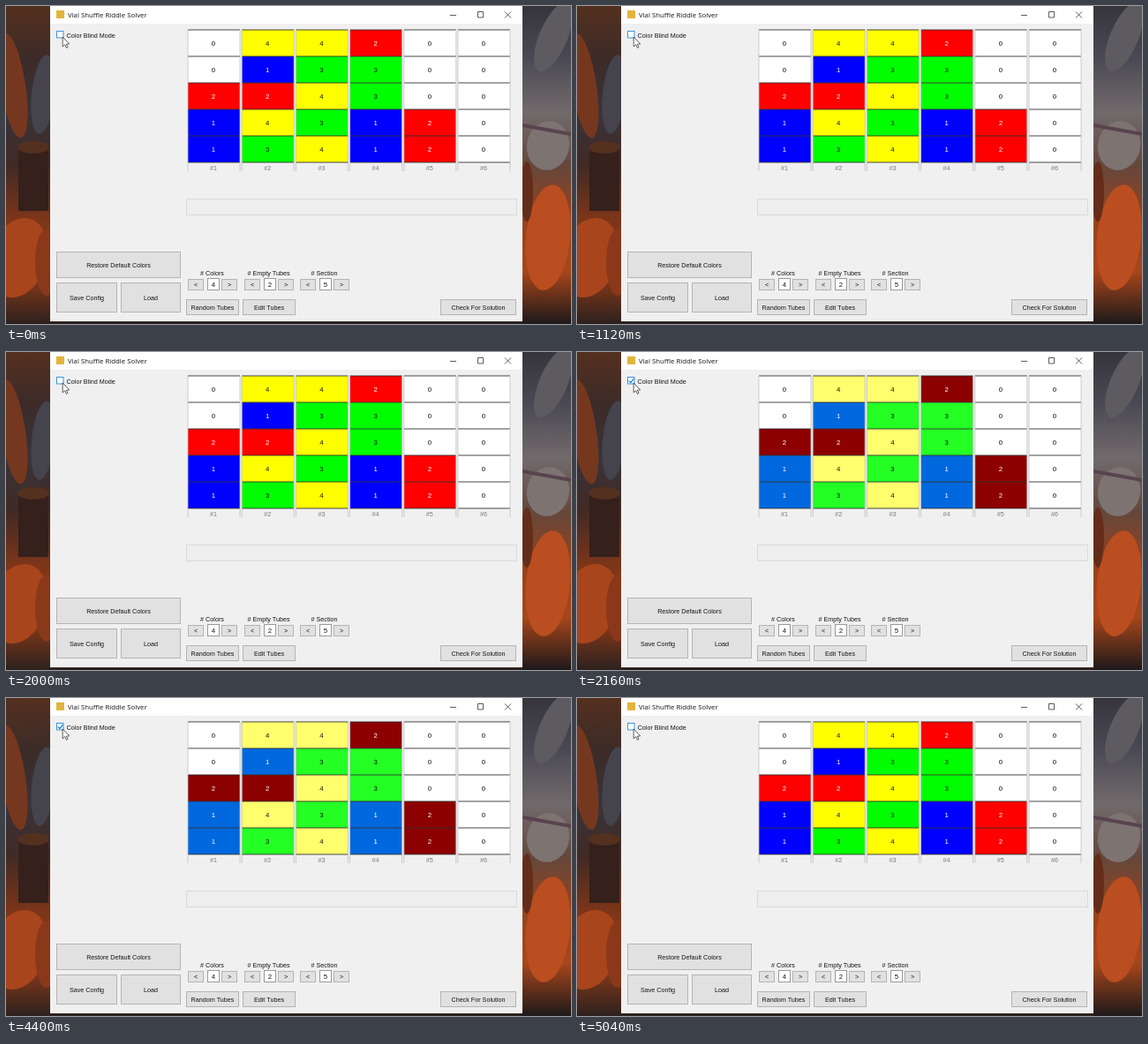
Animation of 640x360 px, one loop 5600 ms. Source, as an HTML page with a canvas:

```html
<!DOCTYPE html>
<html lang="en">
<head>
<meta charset="utf-8">
<title>Puzzle window</title>
<style>
html, body { margin: 0; width: 100%; height: 100%; overflow: hidden; background: #222; }
canvas { display: block; width: 640px; height: 360px; }
</style>
</head>
<body>
<canvas id="stage" width="640" height="360"></canvas>
<script>
const ctx = document.getElementById('stage').getContext('2d');
const LOOP = 5600, CHECK_AT = 2080, UNCHECK_AT = 4560;
const SANS = '"Liberation Sans", Arial, sans-serif';
const UI = '7.2px ' + SANS, DIGIT = '7.8px ' + SANS;
const TITLE = '7.8px "Open Sans", "Noto Sans", sans-serif';

// Fill colours by tube value: empty, blue, red, green, yellow
const NORMAL = ['#fff', '#0000fe', '#fe0000', '#00fe00', '#ffff00'];
const BLIND = ['#fff', '#0068de', '#8c0000', '#24ff24', '#ffff6d'];
const TUBES = ['00211', '41243', '43434', '23311', '00022', '00000'];
const CELL = { x: 206, y: 27, w: 59, h: 30, pitch: 61.2 };

function rect(x, y, w, h, fill, border) {
  if (border) {
    rect(x, y, w, h, border);
    rect(x + 1, y + 1, w - 2, h - 2, fill);
    return;
  }
  ctx.fillStyle = fill;
  ctx.fillRect(x, y, w, h);
}

function text(str, x, y, { color = '#151515', align = 'center', font = UI } = {}) {
  ctx.font = font;
  ctx.fillStyle = color;
  ctx.textAlign = align;
  ctx.fillText(str, x, y + 2.6);
}

function line(color, width, ...points) {
  ctx.beginPath();
  for (let i = 0; i < points.length; i += 2) ctx.lineTo(points[i], points[i + 1]);
  ctx.strokeStyle = color;
  ctx.lineWidth = width;
  ctx.stroke();
}

function blob(x, y, rx, ry, color, tilt = 0) {
  ctx.beginPath();
  ctx.ellipse(x, y, rx, ry, tilt, 0, Math.PI * 2);
  ctx.fillStyle = color;
  ctx.fill();
}

// Vertical strip shaded through evenly spaced colours
function strip(x, w, colors) {
  const shade = ctx.createLinearGradient(0, 0, 0, 360);
  colors.forEach((c, i) => shade.addColorStop(i / (colors.length - 1), c));
  rect(x, 0, w, 360, shade);
}

function wallpaper() {
  strip(0, 50, ['#54301f', '#3c2b28', '#39333a', '#412a25', '#7b3519', '#943c18', '#2c211e']);
  blob(8, 90, 14, 60, '#75381f', -0.15);
  blob(42, 100, 13, 45, '#45434c', 0.1);
  rect(14, 160, 34, 72, '#35201b');
  blob(31, 160, 18, 7, '#54301f');
  blob(14, 285, 32, 46, '#a8451c', 0.3);
  blob(46, 290, 13, 38, '#8a381a');

  strip(585, 55, ['#36343b', '#4b4a54', '#716a6c', '#64473c', '#96421d', '#a8461b', '#1d191a']);
  blob(620, 35, 16, 42, '#5d5a60', 0.4);
  blob(614, 158, 24, 28, '#7d7371', 0.2);
  line('#59434e', 4, 585, 135, 640, 145);
  blob(614, 262, 25, 60, '#ba4e20', 0.1);
  blob(590, 210, 7, 34, '#632d1a');
}

function button(label, x, y, w, h) {
  rect(x, y, w, h, '#e1e1e1', '#b4b4b4');
  text(label, x + w / 2, y + h / 2);
}

function stepper(label, value, x) {
  text(label, x + 27.5, 302);
  button('<', x, 309, 18, 13);
  rect(x + 22, 308, 14, 14, '#fff', '#9a9a9a');
  text(value, x + 29, 315.3, { font: DIGIT });
  button('>', x + 38, 309, 18, 13);
}

function frameWindow() {
  rect(50, 0, 535, 357, '#f0f0f0');
  rect(50, 0, 535, 20, '#fff');
  rect(57, 5, 9, 9, '#e3b43c');
  text('Vial Shuffle Riddle Solver', 70, 10.3, { align: 'left', font: TITLE });
  line('#333', 0.8, 503, 10.5, 510, 10.5);
  line('#333', 0.8, 534.5, 6.5, 540.5, 6.5, 540.5, 13, 534.5, 13, 534.5, 6.5);
  line('#333', 0.8, 565, 6.5, 572, 13.5);
  line('#333', 0.8, 572, 6.5, 565, 13.5);
}

function tube(cells, col, colors) {
  const { y: top, w, h, pitch } = CELL;
  const x = CELL.x + col * pitch, mid = x + w / 2 - 0.5;
  const bottom = top + cells.length * h;
  [...cells].forEach((v, row) => {
    const y = top + row * h;
    rect(x, y, w, h, colors[v]);
    text(v, mid, y + h / 2, { color: '12'.includes(v) ? '#fff' : '#151515', font: DIGIT });
  });
  for (let y = top; y <= bottom; y += h) line('#333', 0.9, x, y, x + w, y);
  for (const side of [x, x + w]) line('#c0c0c0', 0.8, side, top, side, bottom + 10);
  text('#' + (col + 1), mid, bottom + 6.5, { color: '#777' });
}

function checkbox(on) {
  rect(57, 28, 8.5, 8.5, '#fff', '#3b94de');
  if (on) line('#0078d7', 1.1, 58.8, 32.6, 60.8, 34.7, 64.4, 30.2);
  text('Color Blind Mode', 68.6, 33, { align: 'left' });
}

function cursor(x, y) {
  ctx.save();
  ctx.translate(x, y);
  const arrow = new Path2D('M0 0V11L2.5 8.7L4.2 12.4L5.8 11.7L4.2 8.2L7.5 8Z');
  ctx.fillStyle = '#fff';
  ctx.fill(arrow);
  ctx.strokeStyle = '#222';
  ctx.lineWidth = 0.7;
  ctx.stroke(arrow);
  ctx.restore();
}

function draw(t) {
  const blind = t >= CHECK_AT && t < UNCHECK_AT;
  rect(0, 0, 640, 360, '#2c211e');
  wallpaper();
  frameWindow();
  checkbox(blind);
  TUBES.forEach((cells, col) => tube(cells, col, blind ? BLIND : NORMAL));
  rect(204, 218, 375, 19, '#eee', '#d9d9d9');
  button('Restore Default Colors', 57, 278, 141, 30);
  button('Save Config', 57, 313, 69, 34);
  button('Load', 130, 313, 68, 34);
  ['# Colors 4', '# Empty Tubes 2', '# Section 5'].forEach((item, i) =>
    stepper(item.slice(0, -2), item.slice(-1), Math.round(206 + i * 63.6)));
  button('Random Tubes', 204, 332, 60, 18);
  button('Edit Tubes', 268, 332, 60, 18);
  button('Check For Solution', 492, 332, 86, 18);
  cursor(64.2, 35);
}

const start = performance.now();
function tick() {
  draw((performance.now() - start) % LOOP);
  requestAnimationFrame(tick);
}
tick();
</script>
</body>
</html>
```
